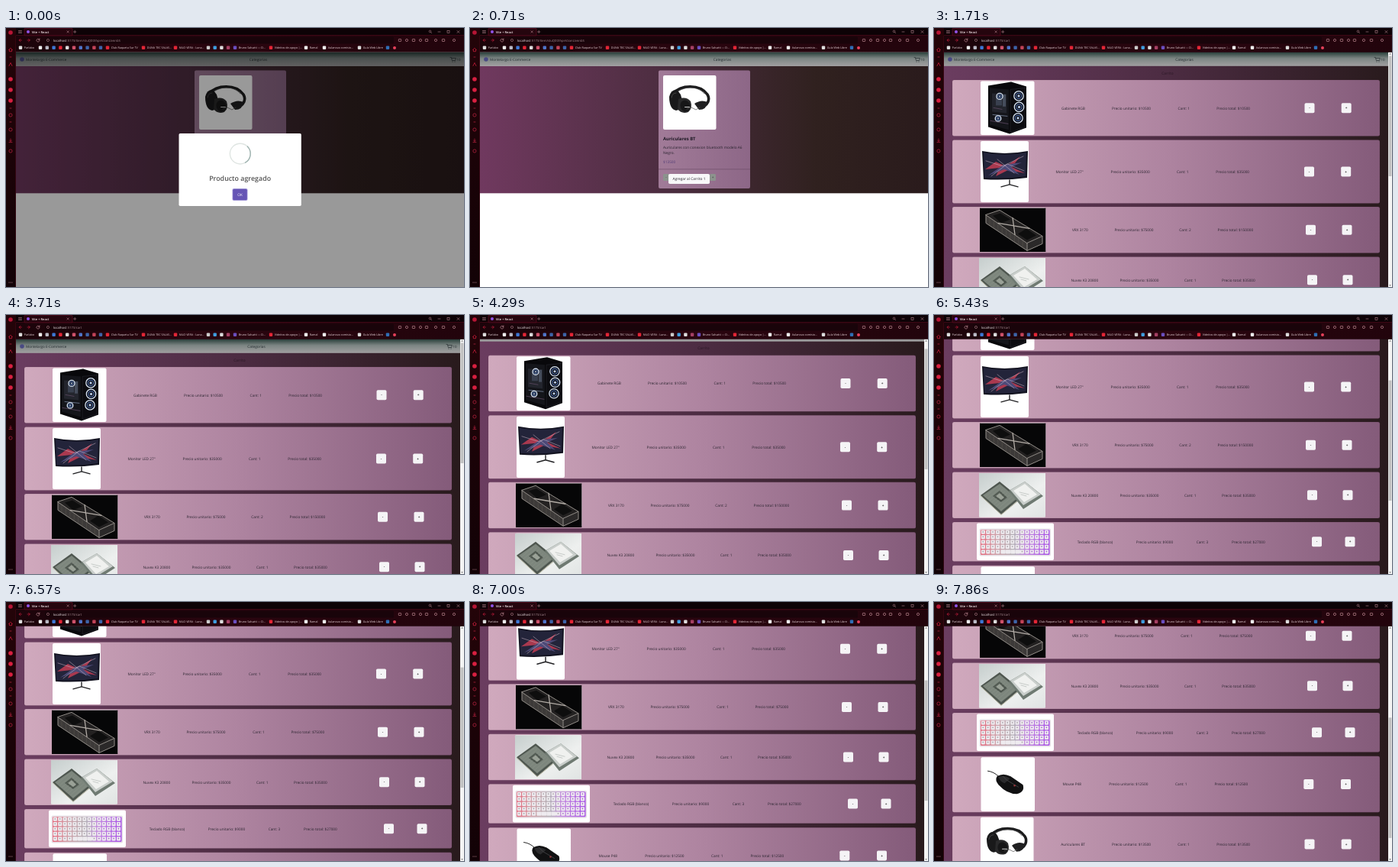
An HTML page that plays this animation: 600 by 339 pixels, repeating every 8 s.

```html
<!DOCTYPE html>
<html lang="es">
<head>
<meta charset="utf-8">
<title>Tienda</title>
<style>
html, body { margin: 0; width: 100%; height: 100%; overflow: hidden; background: #14040a; }
svg { display: block; }
#stage { width: 100vw; height: 100vh; }
text { font-family: "Open Sans", "Noto Sans", sans-serif; font-size: 4.75px; fill: #2b2530; text-rendering: geometricPrecision; white-space: pre; }
</style>
</head>
<body>
<svg id="stage" viewBox="0 0 600 339" xmlns="http://www.w3.org/2000/svg">
  <defs>
    <linearGradient id="bg"><stop offset="0" stop-color="#70395f"/><stop offset=".45" stop-color="#492c3d"/><stop offset=".75" stop-color="#30211f"/><stop offset="1" stop-color="#2a1b1c"/></linearGradient>
    <linearGradient id="cartBg"><stop offset="0" stop-color="#6b3d60"/><stop offset=".5" stop-color="#4c2c42"/><stop offset="1" stop-color="#281a1c"/></linearGradient>
    <linearGradient id="row"><stop offset="0" stop-color="#d0a9bd"/><stop offset=".5" stop-color="#ae84a0"/><stop offset="1" stop-color="#845b7a"/></linearGradient>
    <linearGradient id="card"><stop offset="0" stop-color="#a17b98"/><stop offset="1" stop-color="#8d6787"/></linearGradient>
    <linearGradient id="nav" x2="0" y2="1"><stop offset="0" stop-color="#263d38"/><stop offset=".45" stop-color="#7c8583"/><stop offset="1" stop-color="#a09fa0"/></linearGradient>
    <linearGradient id="bar"><stop offset="0" stop-color="#1b040a"/><stop offset=".5" stop-color="#2a050f"/><stop offset="1" stop-color="#22040c"/></linearGradient>
    <linearGradient id="side" x2="0" y2="1"><stop offset="0" stop-color="#240409"/><stop offset="1" stop-color="#120206"/></linearGradient>
    <linearGradient id="pale" x2="1" y2="1"><stop offset="0" stop-color="#c6cecd"/><stop offset=".6" stop-color="#eef0ef"/><stop offset="1" stop-color="#dfe3e2"/></linearGradient>
    <linearGradient id="glow"><stop offset="0" stop-color="#e4687c"/><stop offset=".2" stop-color="#d3a0a8"/><stop offset=".48" stop-color="#b3b0b6"/><stop offset=".66" stop-color="#c48be0"/><stop offset="1" stop-color="#a953e6"/></linearGradient>
    <clipPath id="view"><rect x="13" y="31.5" width="587" height="308"/></clipPath>
  </defs>
  <g clip-path="url(#view)">
    <g id="item"></g>
    <g id="cart"></g>
    <g id="modal"></g>
  </g>
  <g id="chrome"></g>
</svg>
<script>
const $ = id => document.getElementById(id);
const attrs = o => Object.entries(o).map(([k, v]) => ` ${k}="${v}"`).join('');
const rect = (x, y, w, h, fill, r = 0, more = {}) =>
  `<rect${attrs({ x, y, width: w, height: h, fill, rx: r, ...more })}/>`;
const dot = (cx, cy, r, fill, more = {}) => `<circle${attrs({ cx, cy, r, fill, ...more })}/>`;
const path = (d, fill, more = {}) => `<path${attrs({ d, fill, ...more })}/>`;
const line = (d, stroke, w = .6) =>
  path(d, 'none', { stroke, 'stroke-width': w, 'stroke-linecap': 'round', 'stroke-linejoin': 'round' });
const text = (x, y, s, style = '', more = {}) => `<text${attrs({ x, y, style, ...more })}>${s}</text>`;
const mid = { 'text-anchor': 'middle' };
const range = n => [...Array(n).keys()];

// Product pictures, each drawn from its own top left corner
const art = {
  headphones: () =>
    line('M13 24C23 12 48 11 58 25C62 32 58 38 53 41', '#1c1c1d', 3.6) +
    line('M17 23C27 14 45 13 54 24', '#4a4a4b', .7) +
    path('M8 28Q10 19 17 19Q24 22 25 35Q24 46 17 46Q8 44 8 28Z', '#19191a') +
    path('M20 31Q30 27 36 34Q39 43 33 48Q24 51 19 44Z', '#29292a') +
    `<ellipse cx="29" cy="40" rx="6.5" ry="7.5" fill="#171718" transform="rotate(-20 29 40)"/>` +
    path('M41 37Q50 31 58 35Q57 45 47 45Z', '#202021') +
    line('M11 29Q12 23 17 23M31 44L37 42L43 45L48 42', '#555', .7) +
    rect(28, 41, 7, 1, '#cfcfcf', .4),

  tower: () => {
    const fan = (x, y, r) =>
      dot(x, y, r, '#10131d', { stroke: '#d5e2f2', 'stroke-width': 1.3 }) +
      dot(x, y, r * .6, 'none', { stroke: '#4d6fae', 'stroke-width': 1 }) + dot(x, y, r * .25, '#b9cbe6');
    return path('M10 6L40 1L60 7V61L38 69L10 60Z', '#08080b') +
      path('M12 9L37 11V64L12 57Z', '#14151a') +
      path('M39 11L59 9V60L39 67Z', '#0c0c10', { stroke: '#2d2f36', 'stroke-width': .5 }) +
      path('M15 16L34 17V42L15 40Z', '#23252d') + rect(20, 21, 8, 11, '#39404f') +
      line('M30 18V33M32 18V33M16 44L35 46', '#8898b5', .7) +
      line('M17 35L28 37M13 52L36 56', '#5d4a62', .8) +
      fan(50, 19.5, 6.2) + fan(50.5, 34, 6.2) + fan(49, 48.5, 6.2) + fan(25, 20, 4) + fan(23, 49, 3.8);
  },

  monitor: () =>
    path('M2 13Q31 19 62 13L61 48Q32 52 4 50Z', '#131320') +
    path('M4 15Q31 20 60 15L59 46Q32 50 5 48Z', '#23243a') +
    path('M6 37L20 27L33 33L52 20L41 34L58 42L36 38L20 46L25 35Z', '#a9394f') +
    path('M10 45L30 31L54 28L40 34L51 44L31 37Z', '#4d4a78') +
    line('M7 26L29 33L56 20M14 46L35 30L57 39M22 24L44 42', '#d5bccb', .5) +
    line('M38 51V57M27 60L38 57L49 60', '#202023', 1.4),

  gpu: () =>
    rect(0, 0, 87, 60, '#060607') +
    path('M8 9L26 3L82 37L62 46Z', '#232121') + path('M8 9L62 46V56L8 20Z', '#3d3a39') +
    path('M62 46L82 37V47L62 56Z', '#2b2929') +
    path('M17 10L27 7L40 15L28 20Z', '#0e0e0e') + path('M50 34L61 27L74 36L62 42Z', '#0e0e0e') +
    line('M8 9L26 3L82 37L62 46ZM8 9V20L62 56L82 47V37M62 46V56', '#918c87', 1) +
    line('M24 20L65 27M46 35L43 13', '#b0aaa4', 1.3) +
    range(9).map(i => line(`M${13 + i * 5.4} ${14 + i * 3.7}v8`, '#59544f', .5)).join(''),

  cpu: () =>
    rect(0, 0, 88, 60, 'url(#pale)') +
    path('M2 29L27 11L54 33L29 54Z', '#4e564f') + path('M5 29L27 14L50 33L29 50Z', '#7d867d') +
    path('M18 30L27 23L37 32L29 38Z', '#4c544d') + path('M22 30L27 26L33 32L29 35Z', '#9aa197') +
    range(8).map(i => line(`M${8 + i * 2.9} ${31 + i * 2.5}L${25 + i * 2.9} ${17 + i * 2.4}`, '#9aa193', .3)).join('') +
    line('M2.5 30L29 54.5L54 34', '#aaa78d', .8) +
    path('M39 23L60 11L84 30L58 47Z', '#6f7a72') + path('M41 22L60 11L81 28L58 42Z', '#c9cecb') +
    path('M45 23L60 14L76 28L59 38Z', '#f0f1ef') + line('M53 25L65 28M55 28L62 30', '#a9b0ad', .6),

  keyboard: () =>
    rect(3.5, 7, 93.5, 36, '#e6e0e6', 2) + rect(5, 8.5, 90.5, 33, 'url(#glow)', 1.5) +
    range(70).map(i => {
      const c = i % 14, r = i / 14 | 0, x = 5.8 + c * 6.4, y = 9.2 + r * 6.4;
      const wide = r === 4 && c > 3 && c < 8;
      return rect(x, y, wide ? 6.4 : 5.1, 5.2, '#eeebef', .8) +
        (wide ? '' : rect(x + 1.7, y + 1.5, 1.5, 1.6, c > 8 ? '#a569cf' : '#a9a2a8'));
    }).join(''),

  mouse: () =>
    line('M9 18Q17 19 23 25', '#222', 1) +
    path('M21 25Q29 20 39 25L55 36Q58 45 47 48Q34 48 23 36Q18 30 21 25Z', '#111112') +
    path('M23 26Q31 23 38 28L31 34Q25 32 23 26Z', '#2a2a2c') +
    line('M29 25L34 30L49 39', '#48484b', .8) + dot(44, 37, 1.2, '#9b383d')
};

const picture = (kind, x, y, w, h) =>
  rect(x, y, w, h, '#fff', 2) +
  `<svg x="${x}" y="${y}" width="${w}" height="${h}">${art[kind]()}</svg>`;

const navBar = (catX, cartX) =>
  rect(13, 31.5, 587, 18.3, 'url(#nav)') +
  dot(21, 41, 2.8, '#494a83') +
  text(26, 42.8, 'Montelargo E-Commerce', 'fill:#252d30;font-size:4.6px') +
  text(catX, 42.8, 'Categorias', 'fill:#252d30', mid) +
  line(`M${cartX - 4} 38.5h1.4l1 4h4.2l.8-3h-5.4`, '#252d30', .7) +
  dot(cartX - 1, 44, .6, '#252d30') + dot(cartX + 2, 44, .6, '#252d30') +
  text(cartX + 4.5, 42.8, '10', 'fill:#252d30;font-size:4.4px');

// Product page
const smallButton = (x, s) => rect(x, 191, 8, 9, '#8c938d', 1.5) +
  text(x + 4, 197.2, s, 'fill:#303a34', mid);
$('item').innerHTML =
  rect(13, 31, 587, 308, '#fff') + rect(13, 49.5, 587, 166.8, 'url(#bg)') + navBar(330.5, 586) +
  rect(247, 55.5, 120, 154.5, 'url(#card)', 2) +
  picture('headphones', 253, 62, 69.5, 71) +
  text(253, 147.2, 'Auriculares BT', 'font-size:5.9px;font-weight:700;fill:#201b26') +
  text(253, 157.8, 'Auriculares con conexion bluetooth modelo A6') +
  text(253, 165.3, 'Negro.') +
  text(253, 176.6, '$13500', 'fill:#574079') +
  rect(247, 184.6, 120, .6, '#674761') +
  smallButton(253, '-') + smallButton(314, '+') +
  rect(260, 191, 54, 13, '#f8f8f9', 1.8) + text(287, 199.2, 'Agregar al Carrito 1', '', mid);

// Cart page: top, height, picture x and width, then x of name, unit price, count, total, minus, plus
const rows = [
  ['tower', 'Gabinete RGB', 10500, 1, [68, 73.5, 61, 70.5, 167, 233, 319.5, 370.3, 485.5, 533.7]],
  ['monitor', 'Monitor LED 27"', 35000, 1, [146.5, 83, 61, 63, 159.5, 231.6, 318, 369.3, 485, 533.2]],
  ['gpu', 'VRX 3170', 75000, 2, [234, 60.5, 60, 86.3, 181, 236.4, 321.3, 371.6, 487, 534.5]],
  ['cpu', 'Nuvex K3 20800', 35000, 1, [299.5, 60.5, 59, 87, 179.5, 243.4, 328, 377, 489, 535.5]],
  ['keyboard', 'Teclado RGB (blanco)', 9000, 3, [365, 51.5, 56, 101, 187.8, 264.8, 343.7, 390, 495, 538.5]],
  ['mouse', 'Mouse P48', 12500, 1, [421.8, 73.5, 61.5, 70.5, 168.5, 229.3, 316, 367.5, 484.3, 533]],
  ['headphones', 'Auriculares BT', 13500, 1, [500.3, 73.5, 61, 69.5, 166.3, 233, 319.3, 370.3, 485.5, 533.7]]
];
const button = (x, cy, s) => rect(x, cy - 6.5, 13, 13, '#f5f4f6', 1.8) +
  text(x + 6.5, cy + 1.7, s, 'font-weight:600;fill:#111', mid);
const cartRow = ([kind, name, price, count, [y, h, px, pw, nx, ux, cx, tx, mx, ax]], i) => {
  const c = y + h / 2, base = c + 1.8;
  return rect(24, y, 560, h, 'url(#row)', 2.2, { stroke: '#3a1f33', 'stroke-opacity': .35, 'stroke-width': .4 }) +
    picture(kind, px, y + 1.4, pw, h - 2.8) +
    text(nx, base, name) + text(ux, base, 'Precio unitario: $' + price) +
    text(cx, base, 'Cant: ' + count, '', { id: 'count' + i }) +
    text(tx, base, 'Precio total: $' + price * count, '', { id: 'total' + i }) +
    button(mx, c, '-') + button(ax, c, '+');
};
$('cart').innerHTML = rect(13, 31, 587, 308, 'url(#cartBg)') +
  `<g id="list">${navBar(328, 581)}${text(306, 60.5, 'Carrito', 'fill:#2a1725', mid)}${rows.map(cartRow).join('')}</g>` +
  rect(595, 31.5, 5, 308, '#f4f4f4') +
  path('M596.3 34.6L597.5 33L598.7 34.6ZM596.3 336.2L597.5 337.8L598.7 336.2Z', '#555') +
  `<g id="thumb">${rect(595.6, 36.5, 3.9, 157.5, '#c1c1c1')}</g>`;

// Confirmation dialog
$('modal').innerHTML = rect(13, 31.5, 587, 308, '#000', 0, { opacity: .4 }) +
  rect(226.5, 138, 160.3, 95, '#fff', 1.7) +
  dot(306.8, 164.6, 13.4, 'none', { stroke: '#dfe5e2', 'stroke-width': 1.4 }) +
  `<g id="arc">${line('M316.3 155.1A13.4 13.4 0 0 1 313.5 176.2', '#a1b5b2', 1.4)}</g>` +
  path('M299.5 165.5L304.5 170.5L315 159.5', 'none', {
    id: 'tick', stroke: '#a5dc86', 'stroke-width': 1.6, 'stroke-linecap': 'round', pathLength: 100
  }) +
  text(306.6, 199.5, 'Producto agregado', 'font-size:8.85px;font-weight:600;fill:#545454', mid) +
  rect(296.4, 210, 20.2, 16, '#b4ace0', 2) + rect(297.2, 210.8, 18.6, 14.4, '#6655b5', 1.5) +
  text(306.5, 219.8, 'OK', 'fill:#fff', mid);

// Browser frame
const pink = '#d39aa4', red = '#d81f40';
const mark = (x, fill) => rect(x - 2.2, 23.6, 4.4, 4.4, fill, 1);
const links = [
  [19, 'Parlabo', '#ddd'], [133, 'Club Raqueta Sur TV', '#e32636'], [180, 'DUNA TEC SALAS...', '#e32636'],
  [222, 'NILO VERA - Luna...', '#e32636'], [300, 'Bruno Salvatti — D...', '#6b4fc0'],
  [347, 'Videitos de apoyo |...', '#e32636'], [393, 'Ramal', '#eee'],
  [417, 'Aulanova-comisio...', '#eee'], [463, 'Guía Web Libre', '#ddd']
];
const marks = ['#eee', '#b9b9c4', '#3d78d6', '#e32636', '#ddd', '#cf526b', '#4f74c8', '#3d64a8', '#c24358'];
const tools = [516, 525, 534, 543, 551, 563, 573, 587];
const sideDots = [67, 81, 95];
$('chrome').innerHTML =
  rect(0, 0, 600, 31.5, 'url(#bar)') + rect(0, 0, 600, 9.6, '#0d0206') +
  rect(0, 0, 13, 339, 'url(#side)') + rect(12.5, 10, .5, 329, '#4b0918') +
  rect(13, 9.5, 587, .5, '#650b21') +
  rect(24, .4, 63, 9.5, '#25050e', 1, { stroke: '#82112d', 'stroke-width': .5 }) +
  dot(29, 5, 2, '#9254ea') + text(33.7, 6.5, 'Vite + React', 'fill:#f6e9ec;font-size:4px;font-weight:600') +
  line('M80 3.8l2.3 2.3m0-2.3l-2.3 2.3M88.5 5h3.4M90.2 3.3v3.4', pink, .5) +
  line('M16.5 3.5h4M16.5 5h4M16.5 6.5h4', pink, .5) +
  dot(555.5, 4.4, 1.3, 'none', { stroke: pink, 'stroke-width': .5 }) +
  line('M556.5 5.5l1.2 1.2M566 5h3M591 3.5l3 3m0-3l-3 3', pink, .5) +
  rect(578, 3.5, 3, 3, 'none', 0, { stroke: pink, 'stroke-width': .5 }) +
  line('M19 14.2L17.2 16L19 17.8M17.2 16h3.3M29.5 14.2L31.3 16L29.5 17.8M28 16h3.3', red) +
  line('M43.7 15A2 2 0 1 0 44 16.6M44 14v1.4h-1.4', pink) +
  rect(51, 11.4, 457, 9, '#19040a', 1.5) +
  dot(55, 16, 1.6, 'none', { stroke: pink, 'stroke-width': .5 }) +
  `<text x="62" y="17.5" style="font-size:4.2px;fill:#f4e9ec">localhost<tspan id="url" fill="#a78b92"></tspan></text>` +
  tools.map((x, i) => i % 2 ? dot(x, 16, 1.6, 'none', { stroke: pink, 'stroke-width': .6 })
    : rect(x - 1.7, 14.5, 3.4, 3, 'none', .5, { stroke: pink, 'stroke-width': .6 })).join('') +
  links.map(([x, s, c]) => mark(x, c) + text(x + 4.7, 27.3, s, 'fill:#ead9dd;font-size:3.7px')).join('') +
  marks.map((c, i) => mark(45 + i * 8.8, c)).join('') +
  ['#ccc', '#3f9ee0', '#ddd', '#a64064'].map((c, i) => mark(265 + i * 8.7, c)).join('') +
  mark(124, '#3d64a8') + mark(500, '#2f6eb5') + dot(509, 26, 2, '#e8415a') +
  dot(6, 6, 2.8, '#b71535') +
  line('M3.7 28.5L6 26.2L8.3 28.5M4.4 28.3v2.4h3.2v-2.4M4 49.5L6 45.5L8 49.5', red, .7) +
  sideDots.map(y => dot(6, y, 2.8, red)).join('') +
  [114, 133, 161].map(y => dot(6, y, 2.1, 'none', { stroke: '#c12342', 'stroke-width': .7 })).join('') +
  line('M6 145v3M4.7 147L6 148.5L7.3 147M4 149.6h4M5 38h2M5 105h2M5 123h2', '#c12342', .7) +
  [4, 6, 8].map(x => dot(x, 333, .5, pink)).join('');

const LOOP = 8000, TICK = 1000 / 7;
const ease = (t, from, to) => {
  const p = Math.min(1, Math.max(0, (t - from) / (to - from)));
  return p * p * (3 - 2 * p);
};
const scrollAt = t => 31.25 * ease(t, 4080, 4500) + 62.75 * ease(t, 5090, 5430) + 126 * ease(t, 6800, 7400);
const show = (id, on) => $(id).setAttribute('display', on ? 'inline' : 'none');

function draw(ms) {
  const step = Math.floor((ms + 6) / TICK), t = step * TICK;
  const inCart = step >= 12;
  show('item', !inCart);
  show('cart', inCart);
  show('modal', step < 4);
  $('modal').setAttribute('opacity', step === 3 ? .45 : 1);
  show('tick', step > 0);
  show('arc', step < 2);
  $('tick').setAttribute('stroke-dasharray', `${step === 1 ? 45 : 100} 200`);
  $('url').textContent = inCart ? ':5173/cart' : ':5173/item/sIuQ0tXhpnVzonUvnnbS';

  const scroll = scrollAt(t);
  $('list').setAttribute('transform', `translate(0 ${-scroll})`);
  $('thumb').setAttribute('transform', `translate(0 ${scroll * .522})`);

  const removed = step >= 43, count = removed ? 1 : 2;
  $('count2').textContent = 'Cant: ' + count;
  $('count2').setAttribute('x', removed ? 323.3 : 321.3);
  $('total2').textContent = 'Precio total: $' + 75000 * count;
  $('total2').setAttribute('x', removed ? 373.4 : 371.6);
}

const start = performance.now();
function loop() {
  draw((performance.now() - start) % LOOP);
  requestAnimationFrame(loop);
}
loop();
</script>
</body>
</html>
```
